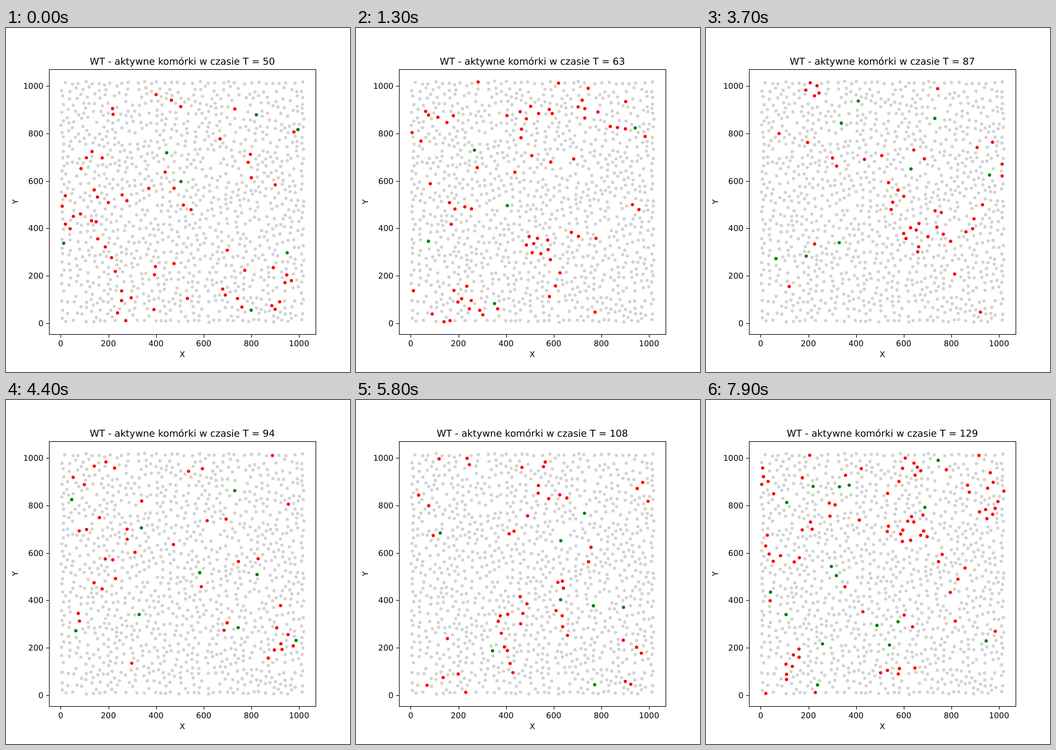
An HTML page that plays this animation: 600 px wide and 600 px high, repeating every 8 s.

```html
<!DOCTYPE html>
<html lang="pl">
<head>
<meta charset="utf-8">
<title>Aktywne komórki</title>
<style>
  html, body { margin: 0; width: 100%; height: 100%; overflow: hidden; background: #fff; }
  svg { display: block; width: 100vw; height: 100vh; }
  text {
    font: 13.89px "DejaVu Sans", sans-serif;
    text-anchor: middle;
    text-rendering: geometricPrecision;
  }
  #title { font-size: 16.67px; }
  #yTicks text { text-anchor: end; }
  .axis { fill: none; stroke: #000; }
  .dots { fill: none; stroke-width: 5.7; stroke-linecap: round; }
</style>
</head>
<body>
<svg viewBox="0 0 600 600">
  <rect width="600" height="600" fill="#fff"/>
  <path id="idle" class="dots" stroke="#d3d3d3"/>
  <path id="active" class="dots" stroke="#f00"/>
  <path id="source" class="dots" stroke="#008000"/>
  <rect class="axis" x="75.5" y="72.5" width="465" height="462"/>
  <path id="ticks" class="axis"/>
  <g id="xTicks"></g>
  <g id="yTicks"></g>
  <text id="title" x="307.5" y="64"></text>
  <text x="307.5" y="574">X</text>
  <text transform="translate(21 303) rotate(-90)">Y</text>
</svg>
<script>
const FIRST = 50, STEPS = 80, STEP_MS = 100;
const SIZE = 1020, CELLS = 1180, GAP = 19;
const SOURCES = 92, FRONTS = 350, SPEED = 6;

// Dense bursts of activity: time and centre
const BURSTS = [
  { t: 63, x: 545, y: 325 },
  { t: 87, x: 235, y: 980 },
  { t: 116, x: 530, y: 712 },
  { t: 129, x: 645, y: 670 }
];

const $ = id => document.getElementById(id);
const px = x => 95.4 + x * 0.4157;
const py = y => 514.5 - y * 0.4133;

function randomFrom(seed) {
  return () => {
    seed = (seed + 0x6D2B79F5) | 0;
    let h = Math.imul(seed ^ (seed >>> 15), 1 | seed);
    h = (h + Math.imul(h ^ (h >>> 7), 61 | h)) ^ h;
    return ((h ^ (h >>> 14)) >>> 0) / 4294967296;
  };
}
const rand = randomFrom(50129);
const between = (a, b) => a + (b - a) * rand();
const angle = () => between(0, 2 * Math.PI);
const place = () => between(3, SIZE);

const cells = [], signals = [];

function addCell(x, y) {
  if (cells.some(c => Math.hypot(c.x - x, c.y - y) < GAP)) return;
  cells.push({ x, y, phase: angle(), turn: angle() });
}

function addBorder() {
  const count = 34;
  for (let i = 0; i < count; i++) {
    const along = () => (i + between(0.1, 0.9)) * SIZE / count;
    const inset = () => between(3, 14);
    addCell(along(), inset());
    addCell(along(), SIZE + 3 - inset());
    addCell(inset(), along());
    addCell(SIZE + 3 - inset(), along());
  }
}

function nearest(x, y) {
  let best = 0, min = Infinity;
  cells.forEach((c, i) => {
    const d = (c.x - x) ** 2 + (c.y - y) ** 2;
    if (d < min) { min = d; best = i; }
  });
  return best;
}

function addSignal(kind, t, x, y, life, vx = 0, vy = 0) {
  signals.push({ kind, t, x, y, vx, vy, end: t + life });
}

// A short row of cells that sweeps sideways
function addFront() {
  const t = between(FIRST - 11, FIRST + STEPS), x = place(), y = place();
  const a = angle(), dx = Math.cos(a), dy = Math.sin(a);
  const n = 1 + Math.floor(5 * rand() ** 2);
  for (let k = 0; k < n; k++) {
    const s = k * 36, late = between(0, 3);
    addSignal("active", t + late, x + dx * s, y + dy * s, between(5, 11), -dy * SPEED, dx * SPEED);
  }
}

function addBurst({ t, x, y }) {
  for (let k = 0; k < 10; k++) {
    const a = angle(), r = between(10, 60);
    addSignal("active", t - between(2, 7), x + r * Math.cos(a), y + r * Math.sin(a), between(8, 12));
  }
}

function build() {
  addBorder();
  for (let i = 0; i < 20000 && cells.length < CELLS; i++) addCell(place(), place());
  for (let i = 0; i < FRONTS; i++) addFront();
  BURSTS.forEach(addBurst);
  for (let i = 0; i < SOURCES; i++) {
    addSignal("source", between(FIRST - 10, FIRST + STEPS), place(), place(), between(5, 14));
  }
}

function drawAxes() {
  let d = "", xs = "", ys = "";
  for (let v = 0; v <= 1000; v += 200) {
    const x = Math.round(px(v)) + 0.5, y = Math.round(py(v)) + 0.5;
    d += `M${x} 535v5M75 ${y}h-5`;
    xs += `<text x="${px(v)}" y="555">${v}</text>`;
    ys += `<text x="65.3" y="${Math.round(py(v) + 5)}">${v}</text>`;
  }
  $("ticks").setAttribute("d", d);
  $("xTicks").innerHTML = xs;
  $("yTicks").innerHTML = ys;
}

function draw(t) {
  const state = cells.map(() => "idle");
  for (const s of signals) {
    if (t < s.t || t > s.end) continue;
    const x = s.x + s.vx * (t - s.t), y = s.y + s.vy * (t - s.t);
    if (Math.min(x, y) > 0 && Math.max(x, y) < SIZE + 4) state[nearest(x, y)] = s.kind;
  }

  const paths = { idle: "", active: "", source: "" };
  cells.forEach((c, i) => {
    const drift = 1.6 * Math.sin(c.phase + t * 0.08);
    const x = px(c.x + drift * Math.cos(c.turn)), y = py(c.y + drift * Math.sin(c.turn));
    paths[state[i]] += `M${x.toFixed(2)} ${y.toFixed(2)}h0`;
  });
  for (const id in paths) $(id).setAttribute("d", paths[id]);
  $("title").textContent = `WT - aktywne komórki w czasie T = ${t}`;
}

build();
drawAxes();

const start = performance.now();
let shown = -1;
function tick() {
  const step = Math.floor((performance.now() - start) / STEP_MS) % STEPS;
  if (step !== shown) draw(FIRST + (shown = step));
  requestAnimationFrame(tick);
}
tick();
</script>
</body>
</html>
```
